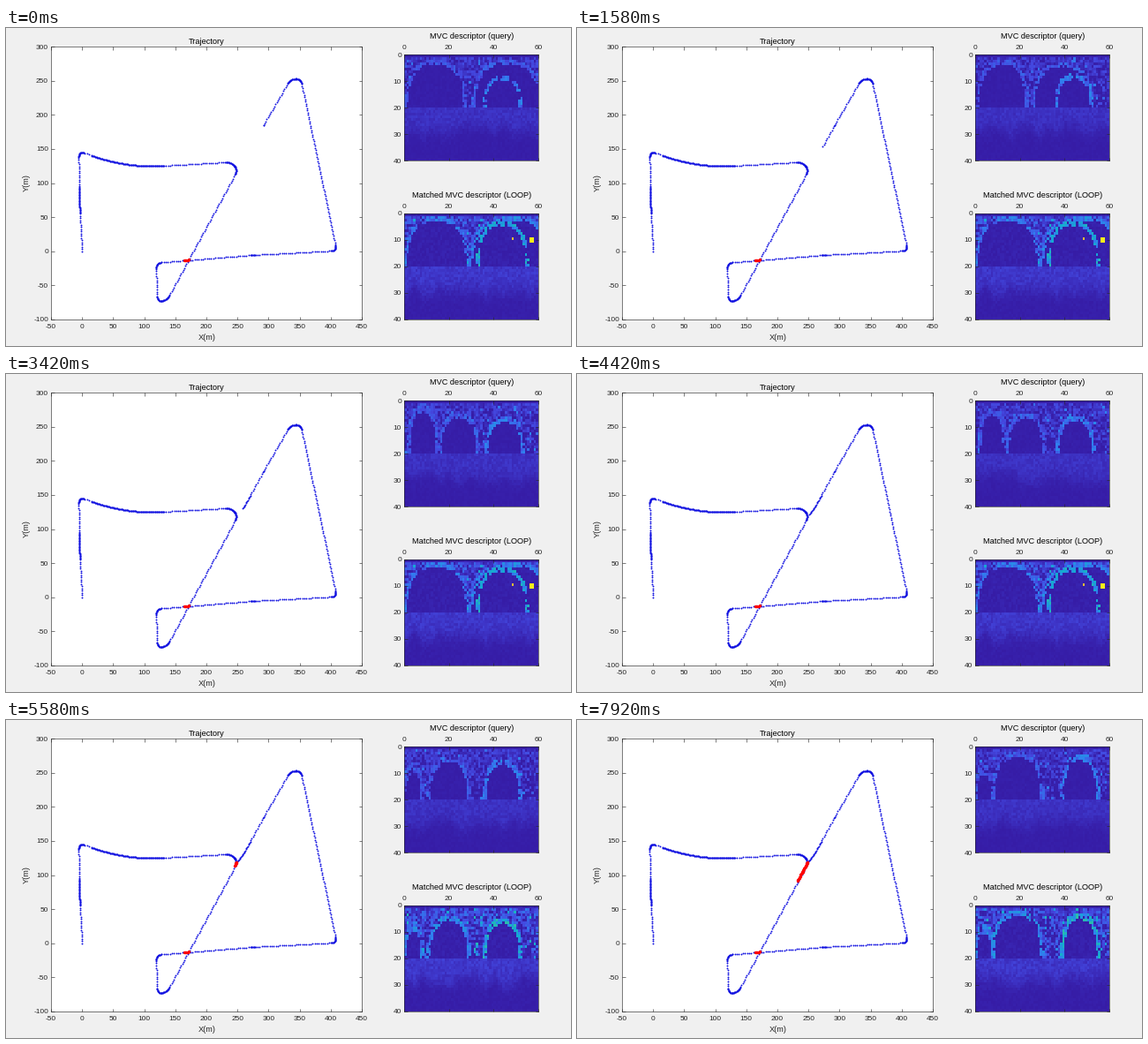
A matplotlib script that plays this animation: 640x360 px, repeating every 8 s.

```python
import numpy as np
import matplotlib.pyplot as plt
from matplotlib.animation import FuncAnimation
from matplotlib.colors import LinearSegmentedColormap

W, H, DPI = 640, 360, 100
LOOP_MS, FRAME_MS = 8000, 40
PX = 72 / DPI  # points per pixel
INK, BLUE = "#262626", "#1010e0"
plt.rcParams.update({"font.family": "Liberation Sans", "axes.linewidth": 0.6 * PX,
                     "axes.edgecolor": INK, "axes.unicode_minus": False})

PARULA = LinearSegmentedColormap.from_list("parula", [
    "#361ca6", "#4448e0", "#3080f0", "#14acd0", "#37c897", "#80cc59", "#e5bb35", "#f9fb15"])

# The sensor delivers a new pose at a steady rate
STEPS = np.linspace(80, 7920, 58)
TIMES = np.append(0, STEPS)

# Route corners in metres: x, y and how far before the corner the bend begins
DRIVEN = [(0, 0, 0), (-4.5, 75, 20), (-5.5, 147, 10), (72, 122, 60), (240, 131, 10),
          (250, 119, 8), (136, -72, 9), (121, -73, 7), (119, -17, 9), (275, -5.5, 4),
          (409.5, 1, 9), (351.5, 253, 8), (335, 252.5, 8), (292, 185, 0)]
APPROACH = [(292, 185, 0), (259, 130, 6), (248.5, 118.5, 3), (232.5, 91.5, 0)]
LOOP_Y = 119  # below this the vehicle is back on its earlier track

# Arches in view: centre column, half width, top row
POSE_MS = [0, 4000, 5580, 7920]
POSES = np.array([[(14, 13, 3), (46, 15, 3), (44, 8, 9)],
                  [(8, 6, 3), (23, 8, 6), (45, 8, 7)],
                  [(4, 4, 8), (20, 9, 5), (44, 8, 6)],
                  [(4, 4, 9), (19, 11, 3), (47, 8, 4)]], float)
FIRST_MATCH = [(14.5, 14, 2), (48, 18, 2), (44, 11, 4)]
ROW, COL = np.mgrid[:40, :60] + 0.5


def trace(corners, straight=3.3, bend=1.0):
    """Dots along straight legs joined by rounded corners."""
    points = np.array(corners, float)
    xy, cuts = points[:, :2], points[:, 2]
    dots, last = [xy[:1]], xy[0]
    for i in range(1, len(xy)):
        leg = xy[i] - xy[i - 1]
        enter = xy[i] - leg / np.hypot(*leg) * cuts[i]
        n = max(2, round(np.hypot(*(enter - last)) / straight))
        dots.append(last + (enter - last) * np.linspace(0, 1, n + 1)[1:, None])
        last = enter
        if cuts[i]:
            out = xy[i + 1] - xy[i]
            leave = xy[i] + out / np.hypot(*out) * cuts[i]
            s = np.linspace(0, 1, round(2 * cuts[i] / bend) + 1)[1:, None]
            dots.append((1 - s) ** 2 * enter + 2 * s * (1 - s) * xy[i] + s ** 2 * leave)
            last = leave
    return np.vstack(dots)


def drive(times):
    """Vehicle positions; it slows for the turn and speeds up again after it."""
    path = trace(APPROACH, 0.5, 0.5)
    length = np.append(0, np.cumsum(np.hypot(*np.diff(path, axis=0).T)))
    gone = np.interp(times, [0, 1580, 3420, 4420, 6750, 7920], [0, 40, 65, 76, 97, 111])
    return np.column_stack([np.interp(gone, length, axis) for axis in path.T])


def arches_at(t):
    i = min(np.searchsorted(POSE_MS, t, "right"), len(POSE_MS) - 1)
    f = np.clip((t - POSE_MS[i - 1]) / (POSE_MS[i] - POSE_MS[i - 1]), 0, 1)
    return POSES[i - 1] + (POSES[i] - POSES[i - 1]) * f * f * (3 - 2 * f)


def descriptor(arches, gain, seed):
    rng = np.random.default_rng(seed)
    noise, clutter = rng.random((2,) + ROW.shape)
    value = 0.02 * noise
    outside = (ROW > 1) & (ROW < 20)
    rings = np.zeros(ROW.shape)
    for (cx, half, top), strength in zip(arches, (0.2, 0.22, 0.3)):
        d = (np.abs((COL - cx) / half) ** 2.5
             + np.abs((20 - ROW) / (20 - top)) ** 2.5) ** 0.4 - 1
        outside &= d > 0
        ring = (np.abs(d) * min(half, 20 - top) < 0.7) & (ROW < 20) & (noise > 0.2)
        rings = np.maximum(rings, ring * strength * (0.4 + 0.7 * noise))
    # echoes above the arches thin out towards the ground
    value += outside * (clutter > 0.1 + ROW / 35) * (0.03 + 0.11 * noise)
    value += outside * (clutter > 0.96) * 0.15
    value = np.maximum(value, rings) * gain
    streak = np.interp(np.arange(60), np.arange(0, 61, 4), rng.random(16))
    fade = 1 / (1 + np.exp((ROW - 26 - 5 * streak) / 1.5))
    ground = 0.015 * noise + fade * (0.045 + 0.04 * noise)
    return np.where(ROW > 20, ground * gain ** 0.5, value)


HEADS = drive(TIMES)
QUERIES = [descriptor(arches_at(t), 1.0, k) for k, t in enumerate(TIMES)]
STATIC_MATCH = descriptor(FIRST_MATCH, 1.5, 7)
STATIC_MATCH[9, 48] = 0.85
STATIC_MATCH[9:11, 56:58] = 0.97
MATCHES = [descriptor(arches_at(t), 1.6, 100 + k) if HEADS[k, 1] < LOOP_Y
           else STATIC_MATCH for k, t in enumerate(TIMES)]

fig = plt.figure(figsize=(W / DPI, H / DPI), dpi=DPI, facecolor="#f0f0f0")


def panel(left, top, right, bottom, xlim, ylim, xticks, yticks):
    ax = fig.add_axes([left / W, 1 - bottom / H, (right - left) / W, (bottom - top) / H])
    ax.set(xlim=xlim, ylim=ylim, xticks=xticks, yticks=yticks)
    ax.tick_params(direction="in", top=True, right=True, length=3.5 * PX, width=0.6 * PX,
                   color=INK, labelcolor=INK, labelsize=8.3 * PX, pad=3 * PX)
    return ax


def label(x, y, text, **style):
    fig.text(x / W, 1 - y / H, text, ha="center", fontsize=9.2 * PX,
             **{"color": "black", "va": "baseline", **style})


def image_panel(top, title):
    ax = panel(451, top, 603, top + 120, (0, 60), (40, 0), range(0, 61, 20), range(0, 41, 10))
    ax.tick_params(axis="x", labeltop=True, labelbottom=False, pad=4.5 * PX)
    label(527.5, top - 17.5, title)
    return ax.imshow(STATIC_MATCH, cmap=PARULA, vmin=0, vmax=1, extent=(0, 60, 40, 0),
                     aspect="auto", interpolation="nearest")


track = panel(51, 21, 403, 330, (-50, 450), (-100, 300),
              range(-50, 451, 50), range(-100, 301, 50))
track.tick_params(axis="x", pad=5.5 * PX)
label(227.5, 17.5, "Trajectory")
label(228, 353, "X(m)", color=INK)
label(23, 175.5, "Y(m)", color=INK, rotation=90, va="center")
query_image = image_panel(30, "MVC descriptor (query)")
match_image = image_panel(210, "Matched MVC descriptor (LOOP)")


def dots(color, size, points=((), ())):
    return track.plot(*points, color=color, ls="", marker="o", mew=0, ms=size * PX)[0]


dots(BLUE, 1.9, trace(DRIVEN).T)
tail = dots(BLUE, 1.9)
dots("red", 3.4, (np.linspace(165, 171, 5), np.linspace(-13.6, -12.6, 5)))
loops = dots("red", 3.4)


def draw(frame):
    k = int(np.searchsorted(STEPS, frame * FRAME_MS, "right"))
    path = HEADS[:k + 1]
    tail.set_data(*path.T)
    loops.set_data(*path[path[:, 1] < LOOP_Y].T)
    query_image.set_data(QUERIES[k])
    match_image.set_data(MATCHES[k])
    return tail, loops, query_image, match_image


anim = FuncAnimation(fig, draw, frames=LOOP_MS // FRAME_MS, interval=FRAME_MS,
                     repeat=True, repeat_delay=0, blit=False)
plt.show()
```
